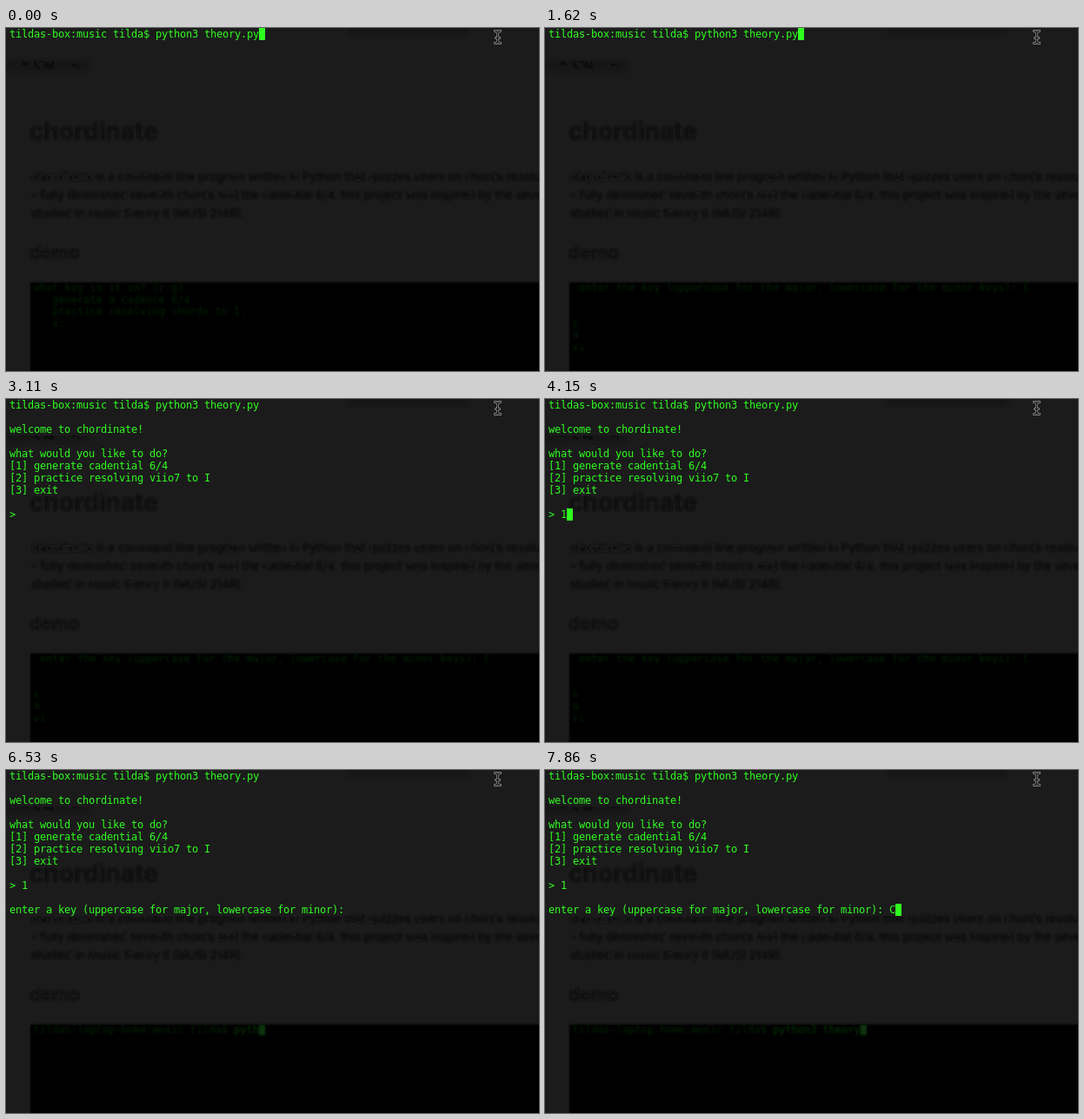
An HTML page for the animation above (8 s loop, 613 by 395 pixels).

```html
<!DOCTYPE html>
<html lang="en">
<head>
<meta charset="utf-8">
<title>Terminal session</title>
<style>
  html, body { margin: 0; width: 100%; height: 100%; overflow: hidden; background: #1b1b1b; }
  svg { display: block; width: 100%; height: 100%; }
  text { white-space: pre; }
  .mono { font: 12px "DejaVu Sans Mono", monospace; }
  .page { font-family: Inter, "Liberation Sans", sans-serif; fill: #0b0b0b; }
  .dim { fill: #0a240a; }
  .lit { fill: #0d350d; }
  .green { fill: #2ffe1f; }
</style>
</head>
<body>
<svg viewBox="0 0 613 395" xmlns="http://www.w3.org/2000/svg">
  <defs>
    <filter id="soft" x="-5%" y="-40%" width="110%" height="180%"><feGaussianBlur stdDeviation="1.1"/></filter>
    <filter id="blur" x="-5%" y="-40%" width="110%" height="180%"><feGaussianBlur stdDeviation="1.7"/></filter>
    <filter id="haze" x="-5%" y="-40%" width="110%" height="180%"><feGaussianBlur stdDeviation="0.9"/></filter>
  </defs>
  <rect width="613" height="395" fill="#1b1b1b"/>

  <!-- page seen through the translucent window -->
  <g class="page">
    <g filter="url(#blur)">
      <rect x="394" y="-4" width="138" height="12" fill="#131313"/>
      <rect x="-4" y="37" width="100" height="13" fill="#151515"/>
      <text x="16" y="47" font-size="11" font-weight="600">README<tspan dx="6">.md</tspan></text>
    </g>
    <g filter="url(#soft)">
      <text x="27" y="129" font-size="28.5" font-weight="600">chordinate</text>
      <text x="27" y="266" font-size="21.3" font-weight="600">demo</text>
    </g>
    <g filter="url(#blur)" font-size="13.4">
      <text x="29" y="176"><tspan font-weight="700">chordinate</tspan> is a command line program written in Python that quizzes users on chords resolution</text>
      <text x="29" y="197">– fully diminished seventh chords and the cadential 6/4. this project was inspired by the seventh</text>
      <text x="29" y="218">studied in music theory II (MUSI 214R).</text>
    </g>
    <rect x="28" y="293" width="600" height="110" fill="#000" filter="url(#haze)"/>
    <rect x="29" y="294" width="584" height="101" fill="#000"/>
  </g>
  <g id="demo" class="mono" filter="url(#haze)"></g>

  <g id="term" class="mono"></g>
  <rect id="cursor" class="green" width="7" height="14"/>

  <!-- mouse pointer -->
  <g fill="none" stroke-linecap="round">
    <path id="beam" d="M562.5 3.5Q565.5 3.5 565.5 6V15Q565.5 17.5 562.5 17.5M568.5 3.5Q565.5 3.5 565.5 6M565.5 15Q565.5 17.5 568.5 17.5M563.5 11.5H567.5" stroke="#858585" stroke-width="2.8"/>
    <use href="#beam"/>
    <path d="M562.5 3.5Q565.5 3.5 565.5 6V15Q565.5 17.5 562.5 17.5M568.5 3.5Q565.5 3.5 565.5 6M565.5 15Q565.5 17.5 568.5 17.5M563.5 11.5H567.5" stroke="#141414" stroke-width="1.2"/>
  </g>
</svg>
<script>
const NS = "http://www.w3.org/2000/svg";
const LOOP = 8000, CELL = 7, ROW = 14, LEFT = 4;
const DEMO_CELL = 7.2, DEMO_ROW = 13.5, DEMO_LEFT = 31.6;
const term = document.getElementById("term");
const demo = document.getElementById("demo");
const cursor = document.getElementById("cursor");

const shell = ["tildas-box:music tilda$ python3 theory.py"];
const menu = [...shell, "", "welcome to chordinate!", "", "what would you like to do?",
  "[1] generate cadential 6/4", "[2] practice resolving viio7 to I", "[3] exit", "", "> "];
const chosen = [...menu.slice(0, -1), "> 1"];
const asking = [...chosen, "", "enter a key (uppercase for major, lowercase for minor): "];
const answered = [...asking.slice(0, -1), asking[asking.length - 1] + "C"];

// [start, lines, cursor visible]
const steps = [
  [0, shell, 1], [140, shell, 0], [730, shell, 1], [1180, shell, 0], [1620, shell, 1],
  [1770, menu, 1], [3110, menu, 0], [3710, menu, 1], [4150, chosen, 1],
  [4900, asking, 1], [6090, asking, 0], [6680, asking, 1], [7120, asking, 0],
  [7420, answered, 1]
];

// Faint demo screens as [column, row, text]
const screens = [
  [0, [[0, 0, "what key is it in? (c-g)"], [3, 1, "generate a cadence 6/4"],
    [3, 2, "practice resolving chords to I: "], [3, 3, "x:"], [1, 7, "..  .. ... ."]]],
  [730, [[1, 0, "enter the key (uppercase for the major, lowercase for the minor keys): C"],
    [0, 3, "s"], [0, 4, "a"], [0, 5, "vi"], [0, 7, ".. ..."]]],
  [4900, [[0, 0, "."], [0, 1, "s"], [0, 2, "a"], [0, 3, "vi"],
    [0, 5, "resp: prev:"], [0, 6, "x  .  :"], [0, 7, ". ."]]],
  [6090, [[0, 0, "tildas-laptop-home:music tilda$"]]]
];
const command = "python3 theory";
const typing = [[6090, 1], [6240, 2], [6380, 3], [6530, 4], [6680, 6], [6830, 7], [6970, 9],
  [7120, 10], [7270, 11], [7420, 12], [7560, 13], [7860, 14]];

function add(parent, tag, attrs, content = "") {
  const el = document.createElementNS(NS, tag);
  for (const key in attrs) el.setAttribute(key, attrs[key]);
  el.textContent = content;
  parent.appendChild(el);
  return el;
}

// Text on a fixed character grid
function gridText(parent, x, y, str, cell, cls) {
  const xs = Array.from(str, (_, i) => (x + i * cell).toFixed(2)).join(" ");
  add(parent, "text", { x: xs, y, class: cls }, str);
}

const at = (list, t) => list.filter(item => item[0] <= t).pop();

function drawTerm(lines) {
  term.replaceChildren();
  lines.forEach((line, i) => {
    if (!line) return;
    add(term, "rect", { x: LEFT, y: i * ROW, width: line.length * CELL, height: ROW, fill: "#1b1b1b" });
    gridText(term, LEFT, i * ROW + 11, line, CELL, "green");
  });
}

function drawDemo(screen, typed) {
  demo.replaceChildren();
  for (const [col, row, str] of screen)
    gridText(demo, DEMO_LEFT + col * DEMO_CELL, 303 + row * DEMO_ROW, str, DEMO_CELL, "dim");
  if (!typed) return;
  const x = DEMO_LEFT + 32 * DEMO_CELL;
  gridText(demo, x, 303, command.slice(0, typed), DEMO_CELL, "lit");
  add(demo, "rect", { x: x + typed * DEMO_CELL, y: 293.5, width: DEMO_CELL, height: 12, class: "lit" });
}

let shownLines, shownDemo;
function render(t) {
  const [, lines, on] = at(steps, t);
  if (lines !== shownLines) drawTerm(shownLines = lines);
  const last = lines.length - 1;
  cursor.setAttribute("x", LEFT + lines[last].length * CELL);
  cursor.setAttribute("y", last * ROW);
  cursor.setAttribute("visibility", on ? "visible" : "hidden");

  const [start, screen] = at(screens, t);
  const typed = (at(typing, t) || [0, 0])[1];
  const key = start + ":" + typed;
  if (key !== shownDemo) {
    shownDemo = key;
    drawDemo(screen, typed);
  }
}

const begin = performance.now();
function tick() {
  render((performance.now() - begin) % LOOP);
  requestAnimationFrame(tick);
}
tick();
</script>
</body>
</html>
```
